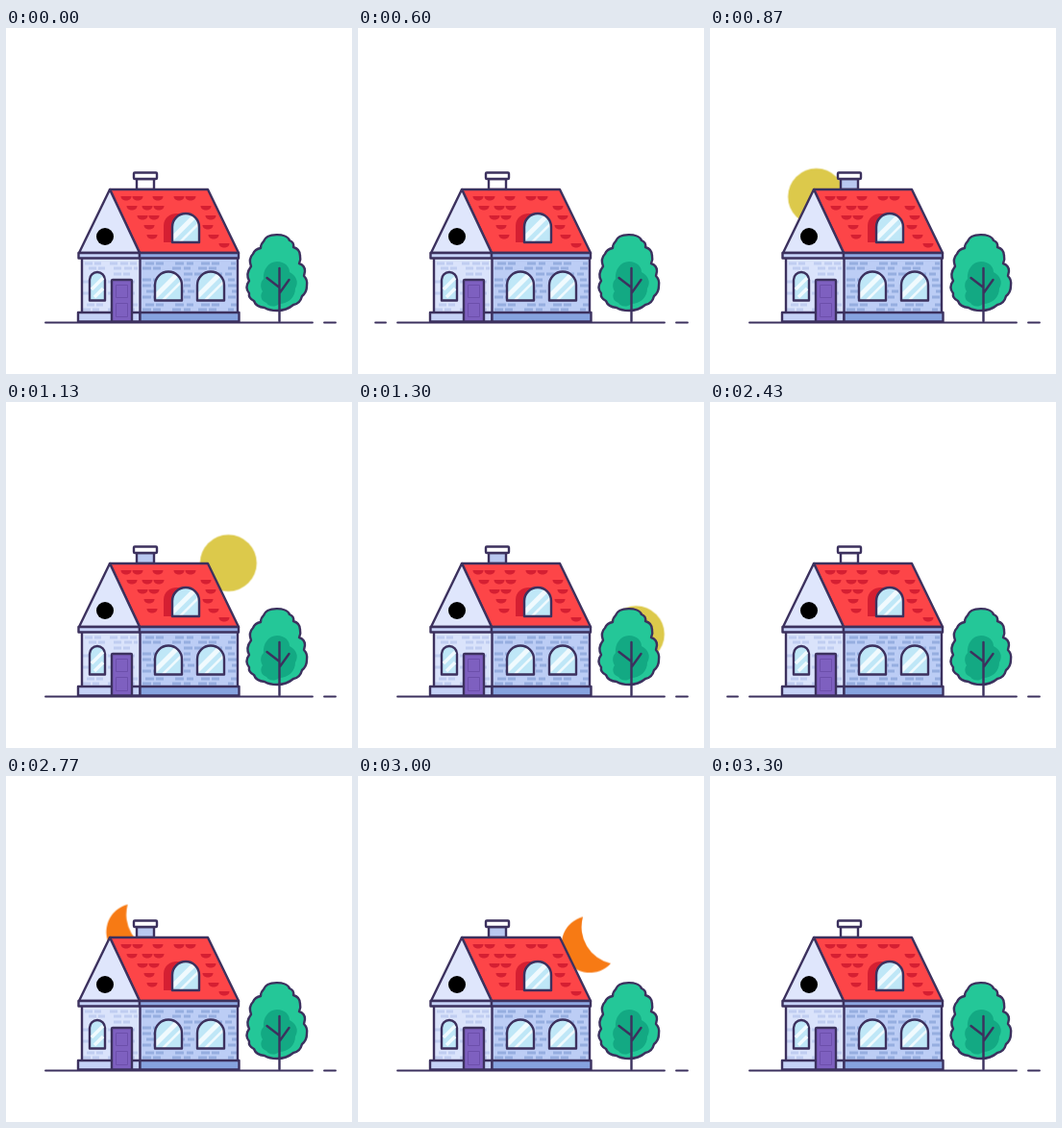
An HTML page without scripts that plays this animation: 360 by 360 pixels, repeating every 3.61 s.

```html
<!DOCTYPE html>
<html lang="en">
<head>
<meta charset="utf-8">
<title>Day and night house</title>
<style>
  html, body { margin: 0; width: 100%; height: 100%; overflow: hidden; background: #fff; }
  svg { display: block; width: 100%; height: 100%; }
  .ink { stroke: #3c315e; stroke-width: 2.4; stroke-linejoin: round; stroke-linecap: round; }
  .thin { stroke-width: 1.8; }

  /* Sun and moon share one arc: sine across, parabola up and down. */
  .across { animation: across 3.61s infinite backwards; }
  .rise { animation: rise 3.61s infinite backwards; }
  .sun, .sun .rise { animation-delay: .6s; }
  .moon, .moon .rise { animation-delay: 2.445s; }
  @keyframes across {
    0% { transform: translateX(50px); animation-timing-function: cubic-bezier(.37, 0, .63, 1); }
    23%, 100% { transform: translateX(304px); }
  }
  @keyframes rise {
    0% { transform: translateY(340px); animation-timing-function: cubic-bezier(.333, .667, .667, 1); }
    11.5% { transform: translateY(153px); animation-timing-function: cubic-bezier(.333, 0, .667, .333); }
    23%, 100% { transform: translateY(340px); }
  }
  .blink { animation: blink 3.61s step-end infinite; }
  @keyframes blink {
    0% { opacity: 0; }
    16.62% { opacity: 1; }
    17.45% { opacity: 0; }
    67.31% { opacity: 1; }
    68.42% { opacity: 0; }
  }
  /* The chimney is tinted while the sun or moon is out. */
  .tint { animation: tint 3.61s step-end infinite; }
  @keyframes tint {
    0% { fill: #fff; }
    17.45% { fill: #b9c8f0; }
    40.72% { fill: #fff; }
    68.42% { fill: #b9c8f0; }
    91.41% { fill: #fff; }
  }
</style>
</head>
<body>
<svg viewBox="0 0 360 360">
  <defs>
    <clipPath id="sky"><path d="M0 0h360v306H0z"/></clipPath>
    <path id="tile" d="M-5.5 0h11c0 6-11 6-11 0z"/>
    <g id="tilePair"><use href="#tile"/><use href="#tile" x="12"/></g>
    <path id="arch" d="M0 30V14a14 14 0 0 1 28 0v16z"/>
    <clipPath id="pane"><use href="#arch"/></clipPath>
    <g id="window">
      <use href="#arch" fill="#bfe7f7"/>
      <g clip-path="url(#pane)" stroke="#f0fafe">
        <path d="M0 26L26 0" stroke-width="5"/>
        <path d="M8 30L30 8" stroke-width="2.5"/>
      </g>
      <use href="#arch" fill="none" class="ink"/>
    </g>
  </defs>

  <g clip-path="url(#sky)">
    <g class="across sun"><circle class="rise" r="29.5" fill="#dcc94b"/></g>
    <g class="across moon">
      <path class="rise" fill="#f77a14" d="M-8-28A29.5 29.5 0 1 0 21 20.500A39 39 0 0 1-8-28z"/>
    </g>
  </g>

  <!-- ground -->
  <path class="ink thin" d="M41 306.500H319M331 306.500h12"/>
  <path class="ink thin blink" d="M18 306.500h11"/>

  <!-- tree -->
  <path class="ink" fill="#24c798" d="M268 222C271 213 292 213 295 221Q300 223 299 228Q306 230 306 237Q307 241 305 245Q311 247 311 253L310 258Q314 262 313 268Q313 275 308 279Q306 287 299 288Q292 294 282 294Q274 294 269 291Q260 290 258 284Q252 281 253 276Q248 270 253 263Q249 256 255 248Q252 240 257 235Q259 230 265 229Q265 225 268 222z"/>
  <path fill="#13a983" d="M282 243c8 0 13 5 13 11 7 4 10 10 6 17 0 9-7 16-17 16-4 4-11 3-13-1-6-2-7-8-4-12-3-5-2-10 1-13-1-9 5-18 14-18z"/>
  <path class="ink" fill="none" d="M284.500 305V250M284.500 270l-13-10M284.500 276l10-14"/>

  <!-- chimney -->
  <g class="ink" fill="#fff">
    <path class="tint" d="M136 157h18v11h-18z"/>
    <rect x="133" y="150.500" width="24" height="6.500" rx="1"/>
  </g>

  <!-- roof -->
  <path fill="#fd4548" d="M108 168H210L242 234H139z"/>
  <g fill="#d51f32">
    <use href="#tilePair" x="125" y="175"/>
    <use href="#tile" x="158" y="175"/>
    <use href="#tilePair" x="180" y="175"/>
    <use href="#tile" x="131" y="185"/>
    <use href="#tilePair" x="147" y="185"/>
    <use href="#tile" x="208" y="185"/>
    <use href="#tilePair" x="142" y="195"/>
    <use href="#tile" x="213" y="195"/>
    <use href="#tile" x="149" y="205"/>
    <use href="#tile" x="210" y="205"/>
    <use href="#tile" x="152" y="215"/>
    <use href="#tile" x="216" y="215"/>
    <use href="#tile" x="227" y="224"/>
    <path d="M164 223V206c0-9 7-13 14-13h10v30z"/>
  </g>
  <use href="#window" x="173" y="193"/>
  <path class="ink" fill="none" d="M108 168H210L242 234H139z"/>
  <path class="ink" fill="#dfe6fc" d="M108 168L76 234h63z"/>
  <circle cx="103" cy="217" r="9"/>

  <!-- walls -->
  <path fill="#dae3fb" d="M79 240h60v56H79z"/>
  <path fill="#bccdf5" d="M140 240h101v56H140z"/>
  <g fill="none" stroke-width="3">
    <g stroke="#c0cdf1" stroke-dasharray="8 2 7 9 8 3">
      <path d="M82 245h55M86 250h51M80 276h57M84 288h53M80 293h54"/>
      <path d="M112 256h26M80 264h58"/>
    </g>
    <g stroke="#96aee0" stroke-dasharray="9 2 8 12 9 3 7 8">
      <path d="M145 245h94M142 250h97M185 256h54M142 262h96"/>
      <path d="M142 268h98M146 274h94M142 280h97M145 288h95M142 293h95"/>
    </g>
  </g>
  <path class="ink" fill="none" d="M79 240v56M139.500 240v56M241 240v56"/>
  <path class="ink" fill="#c5d2f7" d="M75.500 234H139v5.500H75.500z"/>
  <path class="ink" fill="#8ea7e1" d="M139 234h103v5.500H139z"/>
  <path class="ink" fill="#c5d2f7" d="M75 296h64.500v9.500H75z"/>
  <path class="ink" fill="#86a3df" d="M139.500 296H242.500v9.500H139.500z"/>

  <use href="#window" x="155" y="253.500"/>
  <use href="#window" x="199" y="253.500"/>
  <path class="ink" fill="#bfe7f7" d="M87 283.500V262a8 8 0 0 1 16 0v21.500z"/>
  <path stroke="#f0fafe" stroke-width="3.500" d="M89 272l12-12M92 280l9-9"/>

  <!-- door -->
  <rect class="ink" x="110" y="262" width="21" height="43.500" rx="1" fill="#7e60c0"/>
  <path fill="none" stroke="#6c4fab" d="M114.500 267.500h12v13h-12zM114.500 286.500h12v14h-12z"/>
</svg>
</body>
</html>
```
